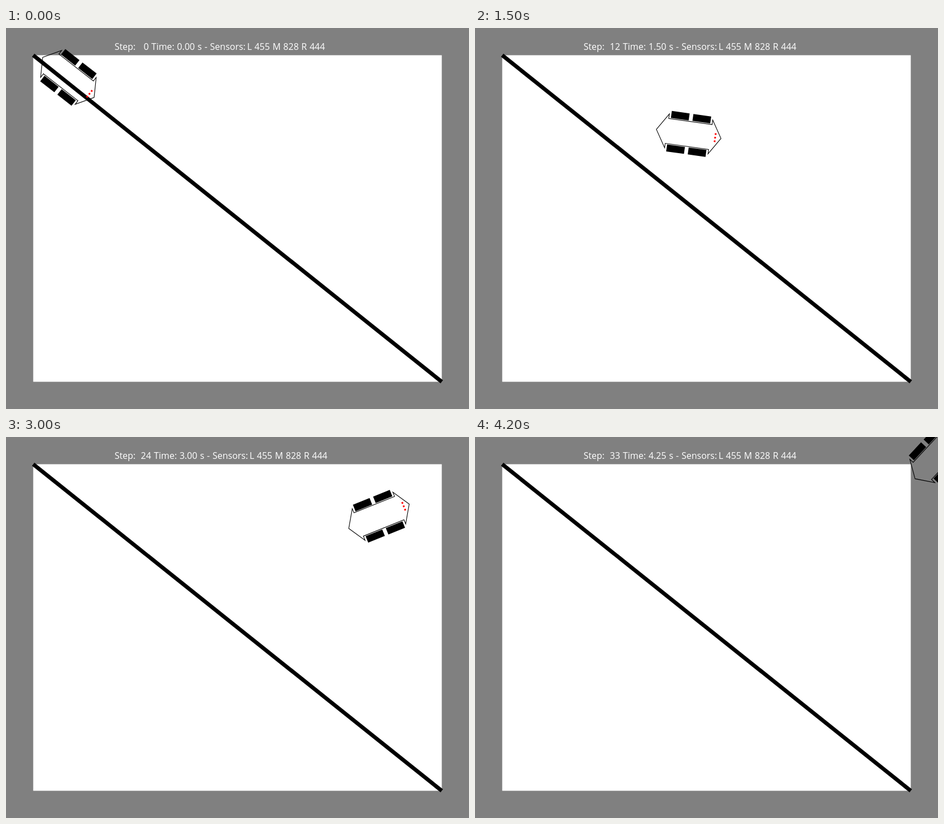
Animation, 825 px wide and 679 px high, one loop 4.25 s. Source, as an HTML page:

```html
<!DOCTYPE html>
<html lang="en">
<head>
<meta charset="utf-8">
<title>Line follower simulation</title>
<style>
  html, body { margin: 0; width: 100%; height: 100%; overflow: hidden; background: #808080; }
  svg { display: block; width: 100%; height: 100%; }
  text {
    font: 16px "Open Sans", "Noto Sans", sans-serif;
    word-spacing: .6px;
    white-space: pre;
    fill: #fff;
  }
  .hull { fill: none; stroke: #000; stroke-width: 1.1; }
  .sensors { fill: #f00; }
</style>
</head>
<body>
<svg viewBox="0 0 825 679">
  <rect x="48.5" y="48.5" width="728" height="582" fill="#fff"/>
  <path d="M48.5 48.5 776.5 630.5" stroke="#000" stroke-width="7"/>
  <g id="car">
    <path class="hull" d="M-58.1 0 -39 -30.5V-22.4H39V-30.5L58.1 0 39 30.5V22.4H-39V30.5Z"/>
    <path d="M-35.4 -36.4h32v12.5h-32zM3.4 -36.4h32v12.5h-32zM-35.4 23.9h32v12.5h-32zM3.4 23.9h32v12.5h-32z"/>
    <path class="sensors" d="M46.1 -8h3v3h-3zM46.1 -1.5h3v3h-3zM46.1 5h3v3h-3z"/>
  </g>
  <text x="193.4" y="39"><tspan id="clock"></tspan><tspan dx="-2">L 455 M 828 R 444</tspan></text>
</svg>
<script>
  const LOOP = 4250, TICK = 250, TURN_AT = 200;
  const SPEED = 48.5, TURN = -5, HEADING = 38;
  const car = document.getElementById('car');
  const clock = document.getElementById('clock');
  const rad = deg => deg * Math.PI / 180;
  const heading = turns => HEADING + TURN * turns;

  // Each tick first turns the car, then drives it forward.
  function position(moves) {
    let x = 111.2, y = 88;
    for (let i = 1; i <= moves; i++) {
      x += SPEED * Math.cos(rad(heading(i)));
      y += SPEED * Math.sin(rad(heading(i)));
    }
    return [x, y];
  }

  function draw(ms) {
    const t = ms % LOOP;
    const moves = Math.floor(t / TICK);
    const turned = t % TICK >= TURN_AT ? 1 : 0;
    const turns = moves + turned;
    const step = String(moves * 2 + turned).padStart(3);
    const [x, y] = position(moves);
    car.setAttribute('transform',
      `translate(${x.toFixed(2)} ${y.toFixed(2)}) rotate(${heading(turns)})`);
    const label = `Step: ${step} Time: ${(turns * TICK / 1000).toFixed(2)} s - Sensors: `;
    if (clock.textContent !== label) clock.textContent = label;
  }

  const start = performance.now();
  function loop() {
    draw(performance.now() - start);
    requestAnimationFrame(loop);
  }
  loop();
</script>
</body>
</html>
```
